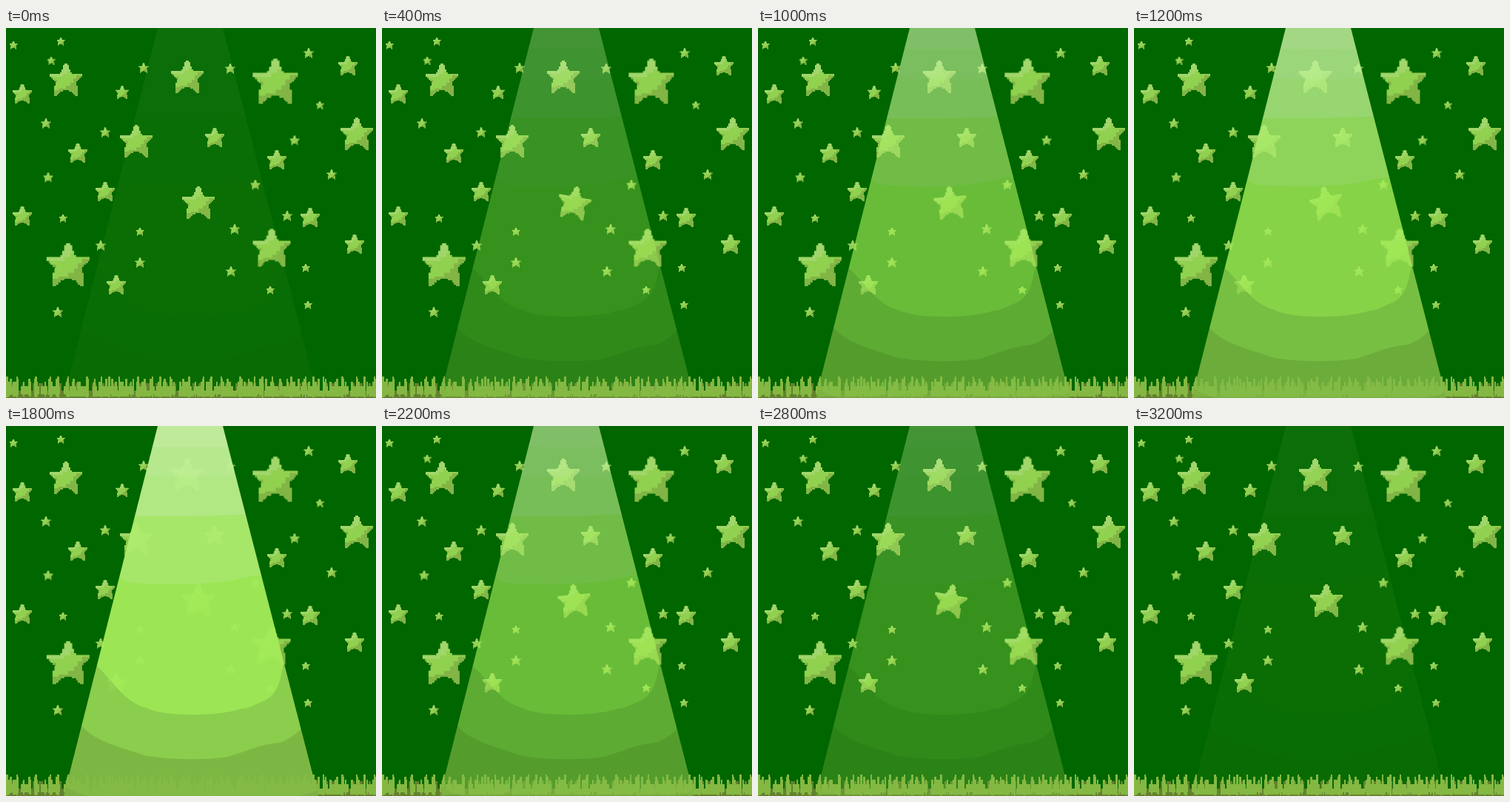
An HTML page without scripts for the animation above (3.4 s loop, 500 by 500 pixels).

```html
<!DOCTYPE html>
<html lang="en">
<head>
<meta charset="utf-8">
<title>Stars in a spotlight</title>
<style>
  html, body { margin: 0; width: 100%; height: 100%; overflow: hidden; background: #006600; }
  svg { display: block; width: 100vw; height: 100vh; }

  /* Half a loop, played forwards then backwards. */
  .beam, .wobble, .nudge, .wink {
    animation: 1700ms step-end -1ms infinite alternate;
  }
  .beam { animation-name: beam; }
  .wobble { animation-name: wobble; }
  .nudge { animation-name: nudge; }
  .w2 { animation-name: wink2; }
  .w3 { animation-name: wink3; }
  .w5 { animation-name: wink5; }
  .w7 { animation-name: wink7; }

  @keyframes beam {
    0% { opacity: .06; }
    11.76% { opacity: .18; }
    23.53% { opacity: .33; }
    35.29% { opacity: .48; }
    47.06% { opacity: .645; }
    70.59% { opacity: .82; }
    82.35%, 100% { opacity: .96; }
  }
  @keyframes wobble {
    0% { transform: rotate(0deg); }
    11.76% { transform: rotate(5deg); }
    23.53% { transform: rotate(10deg); }
    35.29% { transform: rotate(13deg); }
    47.06% { transform: rotate(5deg); }
    58.82% { transform: rotate(-5deg); }
    70.59% { transform: rotate(-11deg); }
    82.35%, 100% { transform: rotate(0deg); }
  }
  @keyframes nudge {
    0%, 58.82%, 100% { transform: rotate(0deg); }
    47.06% { transform: rotate(5deg); }
  }
  @keyframes wink2 { 0%, 35.29%, 100% { opacity: 1; } 23.53% { opacity: 0; } }
  @keyframes wink3 { 0%, 47.06%, 100% { opacity: 1; } 35.29% { opacity: 0; } }
  @keyframes wink5 { 0%, 70.59%, 100% { opacity: 1; } 58.82% { opacity: 0; } }
  @keyframes wink7 { 0%, 94.12%, 100% { opacity: 1; } 82.35% { opacity: 0; } }

  .blades { fill: none; stroke: #84b842; }
  .blades .dark { stroke: #64802f; }
</style>
</head>
<body>
<svg viewBox="0 0 500 500" preserveAspectRatio="none">
  <defs>
    <path id="shape" d="M10 0h2v1h1v3h1v2h1v1h7v2h-1v1h-1v1h-1v1h-1v3h1v7h-2v-1h-1v-1h-1v-1h-2v-1h-4v1h-2v1h-1v1h-1v1h-2v-7h1v-3h-1v-1h-1v-1h-1v-1h-1v-2h7v-1h1v-2h1v-3h1z"/>
    <clipPath id="cut"><use href="#shape"/></clipPath>
    <g id="star" transform="translate(-11 -11)" shape-rendering="crispEdges">
      <use href="#shape" fill="#82b546"/>
      <g clip-path="url(#cut)">
        <path d="M0 0h22v8h-4v2h-2v3h-2v2h-3v2H6v1H3v-5h2v-2H2V9H0z" fill="#91d150"/>
        <path d="M8 0h6v5h-2v2h-3v2H0V7h7z" fill="#a0d66a"/>
      </g>
    </g>
    <g id="t"><use href="#star" transform="scale(.5)"/></g>
    <g id="s"><use href="#star" transform="scale(.6)"/></g>
    <g id="m"><use href="#star" transform="scale(1.22)"/></g>
    <g id="l"><use href="#star" transform="scale(2)"/></g>
    <g id="xl"><use href="#star" transform="scale(2.78)"/></g>
    <clipPath id="cone"><path d="M205 0H293L422 500H78z"/></clipPath>
  </defs>

  <rect width="500" height="500" fill="#006600"/>

  <g>
    <use href="#t" x="10" y="23"/>
    <use href="#t" x="74" y="18"/>
    <use href="#t" x="61" y="44" class="wink w7"/>
    <use href="#t" x="77" y="257"/>
    <use href="#t" x="181" y="275"/>
    <use href="#t" x="357" y="354"/>
    <use href="#t" x="405" y="324"/>
    <use href="#t" x="408" y="374"/>
    <use href="#t" x="424" y="104" class="wink w5"/>

    <use href="#s" x="186" y="54"/>
    <use href="#s" x="54" y="129"/>
    <use href="#s" x="134" y="141"/>
    <use href="#s" x="57" y="202" class="wink w2"/>
    <use href="#s" x="128" y="294"/>
    <use href="#s" x="181" y="317"/>
    <use href="#s" x="70" y="384"/>
    <use href="#s" x="303" y="55"/>
    <use href="#s" x="409" y="34"/>
    <use href="#s" x="390" y="152" class="wink w2"/>
    <use href="#s" x="337" y="212" class="wink w3"/>
    <use href="#s" x="309" y="272"/>
    <use href="#s" x="304" y="329"/>
    <use href="#s" x="440" y="198"/>
    <use href="#s" x="380" y="254"/>
    <use href="#star" transform="translate(157 87) scale(.83)"/>

    <use href="#m" x="22" y="89"/>
    <use href="#m" x="97" y="169"/>
    <use href="#m" x="134" y="221"/>
    <use href="#m" x="22" y="254"/>
    <use href="#m" x="149" y="347"/>
    <use href="#m" x="282" y="148"/>
    <use href="#m" x="366" y="178"/>
    <use href="#m" x="411" y="256"/>
    <use href="#m" x="471" y="292"/>
    <use href="#m" x="462" y="51"/>

    <use href="#l" x="81" y="70"/>
    <use href="#l" x="245" y="66"/>
    <use href="#l" x="176" y="153"/>
    <use href="#l" x="474" y="143"/>
    <g transform="translate(260 236)"><use href="#l" class="wobble"/></g>

    <use href="#star" transform="translate(359 297) scale(2.32)"/>
    <use href="#star" transform="translate(84 320) scale(2.65)"/>
    <g transform="translate(364 72)"><use href="#xl" class="nudge"/></g>
  </g>

  <g class="blades" shape-rendering="crispEdges">
    <path class="dark" d="M0 495H500" stroke-width="10"/>
    <path class="dark" d="M0 490H500" stroke-width="20" stroke-dasharray="3 5 6 8 3 11"/>
    <path d="M0 485H500" stroke-width="28" stroke-dasharray="3 11 2 23 3 17 2 8"/>
    <path d="M5 485H500" stroke-width="22" stroke-dasharray="3 7 2 13 3 5 3 16"/>
    <path d="M2 488H500" stroke-width="20" stroke-dasharray="3 4 5 9 2 6"/>
    <path d="M8 489H500" stroke-width="11" stroke-dasharray="9 3 14 5 6 2"/>
    <path d="M84 494H500" stroke-width="8" stroke-dasharray="12 5 7 9 21 4"/>
  </g>

  <g class="beam">
    <g clip-path="url(#cone)">
      <rect width="500" height="500" fill="#7bb043"/>
      <path d="M70 0H430V485Q415 499 390 500H115Q90 497 70 479z" fill="#83bc47"/>
      <path d="M90 0H410V396C399 411 388 421 370 428C340 431 330 438 300 447C265 452 225 451 190 446C160 435 117 427 100 402z" fill="#92d351"/>
      <path d="M110 0H390V300L376 318C370 342 370 360 350 371C338 375 330 382 318 382C290 392 215 394 190 381C158 373 145 343 118 320z" fill="#a4ec58"/>
      <path d="M140 0H360V201C325 201 318 208 290 211C250 215 195 214 170 212Q158 210 150 202z" fill="#aeed6e"/>
      <path d="M160 0H340V118Q300 121 250 122H160z" fill="#b9ef89"/>
      <path d="M170 0H330V67Q250 71 170 67z" fill="#bfef95"/>
      <path d="M170 0H330V27Q250 30 170 27z" fill="#c7f1a1"/>
    </g>
  </g>
</svg>
</body>
</html>
```
